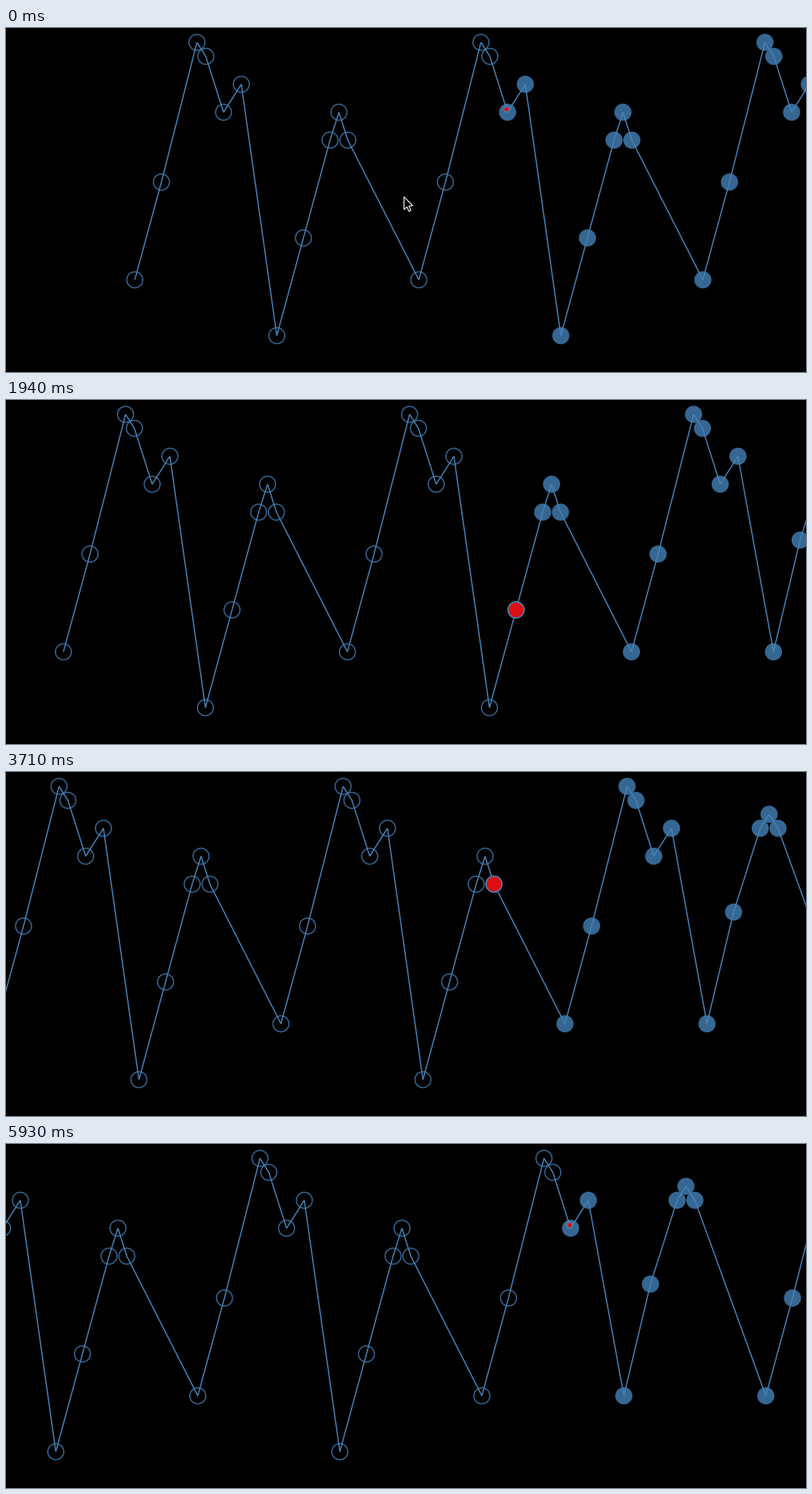
A matplotlib script that plays this animation: 1002 px wide and 431 px high, repeating every 6030 ms.

```python
import matplotlib.pyplot as plt
import numpy as np
from matplotlib.animation import FuncAnimation

W, H, DPI = 1002, 431, 64
PX = 72 / DPI                       # one pixel in points
LOOP, TICK, STEPS = 6030, 30, 41    # ms, ms, held pictures per loop
LINE, DISC, RED = "#4682b4", "#366793", "#dc1014"
UNIT, ROW = 11.117, 17.5            # pixels per beat and per pitch step
X0, Y0 = 161.3, 385.5
FIRST, BEATS_PER_STEP = 42, 0.8     # beat sounding as the loop begins
TRAVEL, GROW = 1.0, 1.4             # in steps
DOT_MIN, DOT_MAX = 3.6, 10

# The picture holds a little longer early in the loop.
STARTS = np.interp(range(STEPS), [0, 8, 20, 40], [0, 1200, 2960, 5930])


def smooth(p):
    p = np.clip(p, 0, 1)
    return p * p * (3 - 2 * p)


def bar(number, low, mid, high, peak):
    """Rise and dip, then an arpeggio: (beat, pitch) pairs of one bar."""
    head = [(0, 4), (3, 11), (7, 21), (8, 20), (10, 16), (12, 18)]
    tail = [(16, low), (19, mid), (22, high), (23, peak), (24, high)]
    return [(32 * number + beat, pitch) for beat, pitch in head + tail]


notes = [note for n in range(4)
         for note in bar(n, *((0, 7, 14, 16) if n < 2 else (4, 12, 18, 19)))]
beats, pitches = np.array(notes).T
note_x, note_y = X0 + UNIT * beats, Y0 - ROW * pitches
arrive = (beats - FIRST) / BEATS_PER_STEP + 0.055   # in steps

fig = plt.figure(figsize=(W / DPI, H / DPI), dpi=DPI, facecolor="black")
ax = fig.add_axes([0, 0, 1, 1])
ax.set(xlim=(0, W), ylim=(H, 0))
ax.axis("off")

discs = [ax.add_patch(plt.Circle((x, y), 10, ec=DISC, lw=1.5 * PX, zorder=1))
         for x, y in zip(note_x, note_y)]
line, = ax.plot([], [], color=LINE, lw=1.5 * PX, zorder=2,
                solid_joinstyle="bevel", solid_capstyle="butt")
dot = ax.add_patch(plt.Circle((0, 0), DOT_MIN, fc=RED, ec=LINE,
                              lw=1.5 * PX, zorder=3))
arrow = np.array([(0, 0), (0, 16), (3.7, 12.6), (6.2, 18.3),
                  (8.6, 17.2), (6.2, 11.6), (11, 11.2)])
cursor = ax.add_patch(plt.Polygon(arrow, fc="black", ec="white",
                                  lw=1.1 * PX, joinstyle="miter", zorder=4))


def draw(tick):
    now_ms = (tick + 1) * TICK - 1
    step = np.searchsorted(STARTS, now_ms, side="right") - 1
    xs = note_x - np.interp(step, [0, 8, 40], [0, 54.7, 276.8])
    line.set_data(xs, note_y)

    # The marker hops to the next note, then swells over it.
    current = np.searchsorted(arrive - TRAVEL, step, side="right") - 1
    late = step - arrive[current]
    hop = np.clip(1 + late / TRAVEL, 0, 1)
    pair = slice(current - 1, current + 1)
    dot.center = [np.interp(hop, [0, 1], c[pair]) for c in (xs, note_y)]
    dot.set_radius(DOT_MIN + (DOT_MAX - DOT_MIN) * smooth(late / GROW))

    for i, disc in enumerate(discs):
        disc.center = xs[i], note_y[i]
        disc.set_facecolor(DISC if i >= current else "none")

    move = smooth(step / 7)
    cursor.set_xy(arrow + (498.5 + 169 * move, 211.5 + 212 * move))
    cursor.set_visible(step <= 8)
    return [*discs, line, dot, cursor]


anim = FuncAnimation(fig, draw, frames=LOOP // TICK, interval=TICK,
                     repeat=True, repeat_delay=0, blit=False)
plt.show()
```
